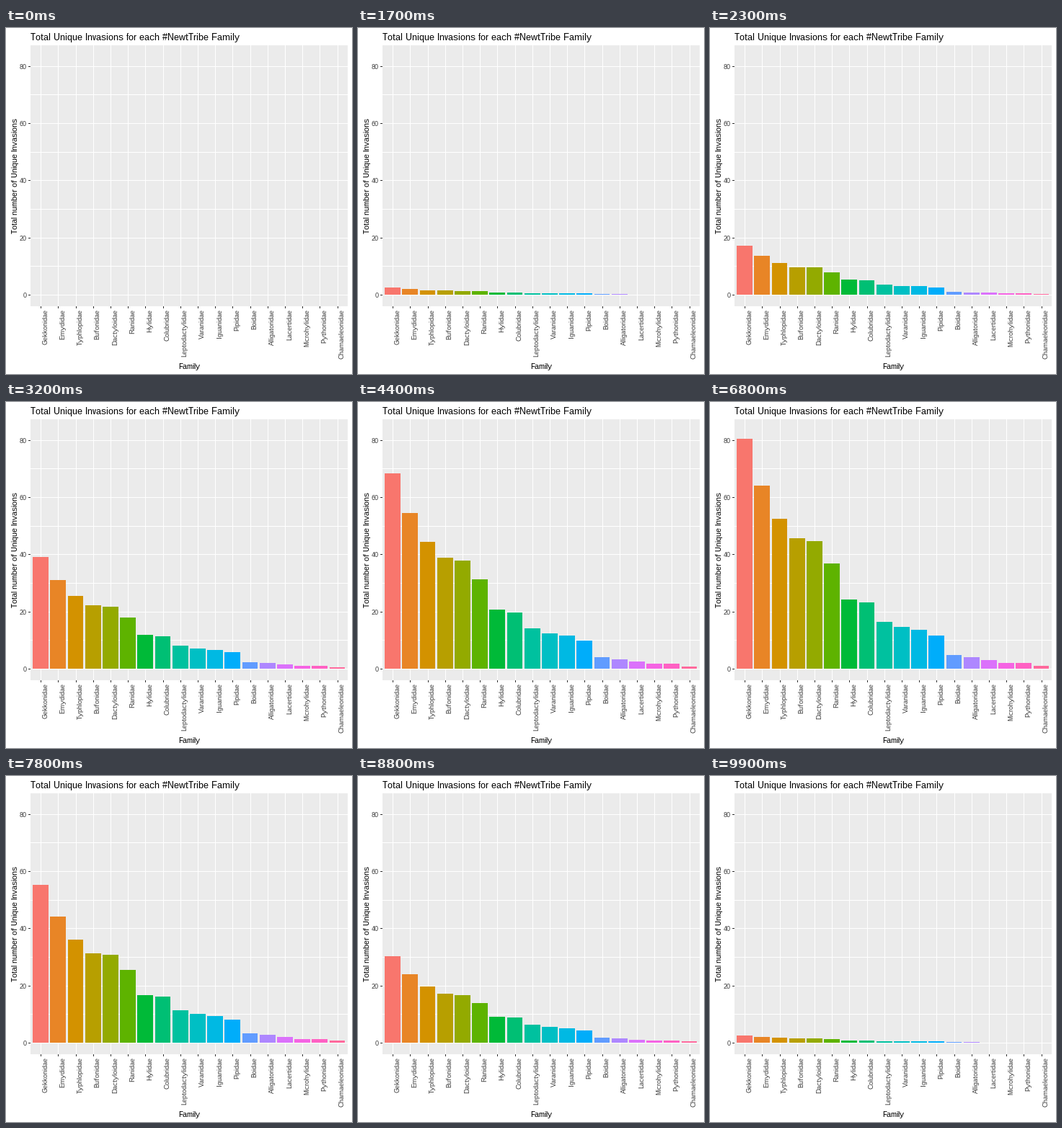
A matplotlib script that plays this animation: 480x480 px, repeating every 10000 ms.

```python
import matplotlib.pyplot as plt
from matplotlib.animation import FuncAnimation
from matplotlib.patches import Rectangle

plt.rcParams.update({
    "font.family": "Liberation Sans",
    "text.hinting": "native",
    "text.hinting_factor": 1,
    "text.kerning_factor": 6,       # practically no kerning
})

SIZE, DPI = 480, 96
ZERO_Y, UNIT = 369.87, 3.963        # pixel row of zero, pixels per invasion
FIRST_X, STEP = 48.12, 24.2         # first bar centre, bar spacing
LEFT, RIGHT, TOP, BOTTOM = 34, 474, 24, 386
FRAMES, INTERVAL = 100, 100
TICK_COLOR = "#333333"

FAMILIES = [
    ("Gekkonidae", 83, "#F8766D"), ("Emydidae", 66, "#E88526"),
    ("Typhlopidae", 54, "#D39200"), ("Bufonidae", 47, "#B79F00"),
    ("Dactyloidae", 46, "#93AA00"), ("Ranidae", 38, "#5EB300"),
    ("Hylidae", 25, "#00BA38"), ("Colubridae", 24, "#00BF74"),
    ("Leptodactylidae", 17, "#00C19F"), ("Varanidae", 15, "#00BFC4"),
    ("Iguanidae", 14, "#00B9E3"), ("Pipidae", 12, "#00ADFA"),
    ("Boidae", 5, "#619CFF"), ("Alligatoridae", 4, "#AE87FF"),
    ("Lacertidae", 3, "#DB72FB"), ("Microhylidae", 2, "#F564E3"),
    ("Pythonidae", 2, "#FF61C3"), ("Chamaeleonidae", 1, "#FF699C"),
]

fig = plt.figure(figsize=(SIZE / DPI, SIZE / DPI), dpi=DPI, facecolor="white")
ax = fig.add_axes([0, 0, 1, 1])
ax.set(xlim=(0, SIZE), ylim=(SIZE, 0))
ax.axis("off")


def box(x0, y0, x1, y1, color, z=1):
    patch = Rectangle((x0, y0), x1 - x0, y1 - y0, facecolor=color,
                      linewidth=0, antialiased=False, zorder=z)
    return ax.add_patch(patch)


def label(x, y, text, px, color="black", ha="left", angle=0):
    ax.text(x, y, text, fontsize=px * 72 / DPI, color=color, ha=ha,
            va="baseline", rotation=angle, rotation_mode="anchor")


def row(value):
    return round(ZERO_Y - UNIT * value)


def level(frame):
    """Fraction of full height: linear rise, hold, linear fall."""
    if frame <= 50:
        return max(0, (frame - 16) / 34)
    return min(1, (FRAMES - frame) / 33)


box(LEFT, TOP, RIGHT, BOTTOM, "#EBEBEB")
for value in range(0, 90, 10):
    y = row(value)
    box(LEFT, y, RIGHT, y + 1, "white", 2)
    if value % 20 == 0:
        box(LEFT - 3, y, LEFT, y + 1, TICK_COLOR, 2)
        label(29, y + 4, str(value), 9, TICK_COLOR, "right")

bars = []
for i, (name, _, color) in enumerate(FAMILIES):
    center = FIRST_X + i * STEP
    x = round(center)
    box(x, TOP, x + 1, BOTTOM, "white", 2)
    box(x, BOTTOM, x + 1, BOTTOM + 3, TICK_COLOR, 2)
    label(center + 9, 390, name, 9, TICK_COLOR, "right", 90)
    x0, x1 = round(center - 0.45 * STEP), round(center + 0.45 * STEP)
    bars.append(box(x0, row(0), x1, row(0), color, 3))

label(34, 17, "Total Unique Invasions for each #NewtTribe Family", 13)
label(254, 473, "Family", 11, ha="center")
label(16, 205, "Total number of Unique Invasions", 11, ha="center", angle=90)


def update(frame):
    for bar, (_, count, _) in zip(bars, FAMILIES):
        top = row(count * level(frame))
        bar.set_y(top)
        bar.set_height(row(0) - top)
        bar.set_visible(top < row(0))
    return bars


anim = FuncAnimation(fig, update, frames=FRAMES, interval=INTERVAL,
                     repeat=True, repeat_delay=0, blit=False)
plt.show()
```
